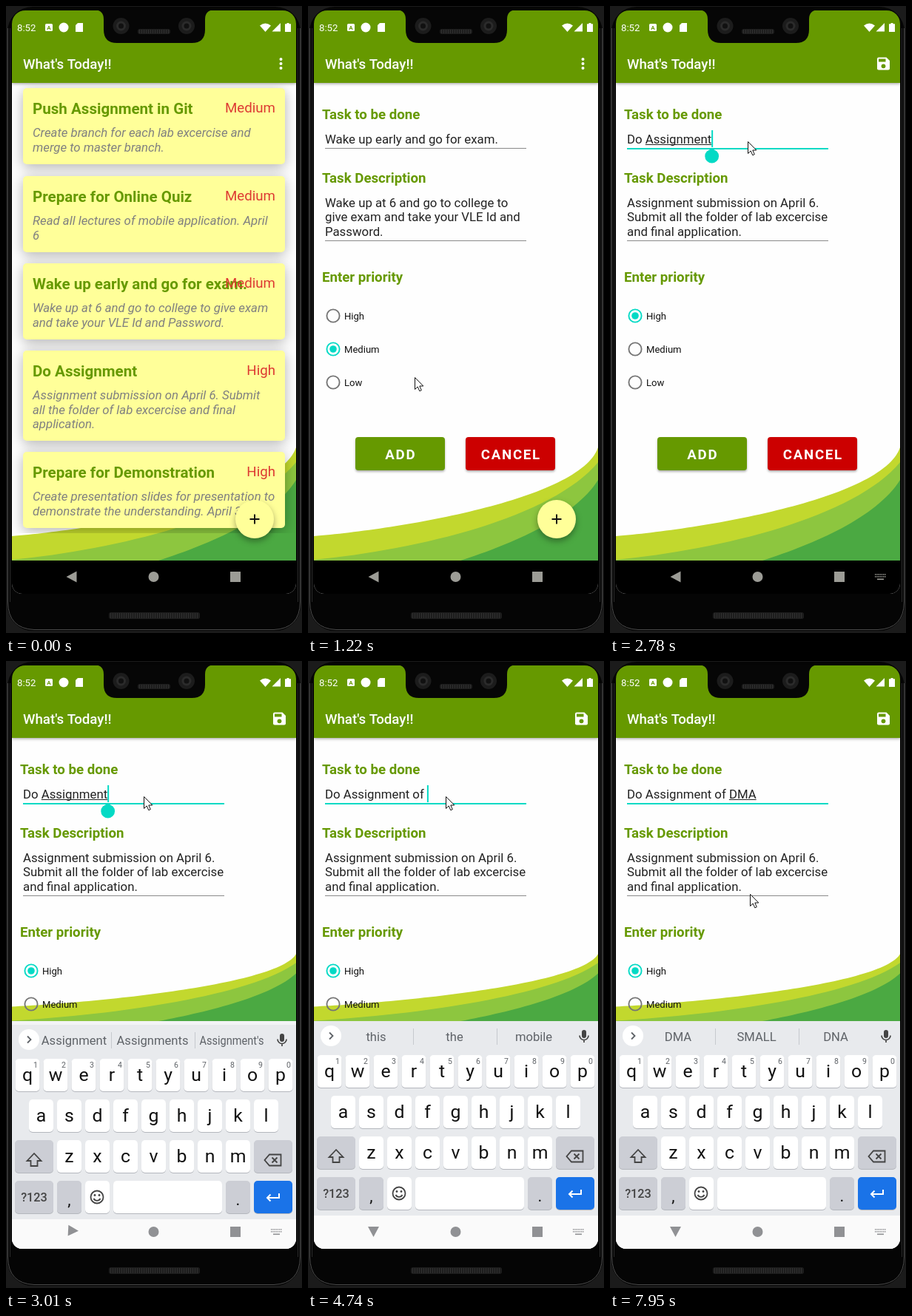
These frames come from a looping animation (400 by 848 pixels, 8000 ms). An HTML page with a canvas:

```html
<!DOCTYPE html>
<html lang="en">
<head>
<meta charset="utf-8">
<title>To-do app</title>
<style>
html, body { margin: 0; width: 100%; height: 100%; overflow: hidden; background: #111; }
canvas { display: block; width: 400px; height: 848px; }
</style>
</head>
<body>
<canvas id="stage" width="400" height="848"></canvas>
<script>
const c = document.getElementById('stage').getContext('2d');
const LOOP = 8000, TAU = Math.PI * 2;
const GREEN = '#669900', TEAL = '#03dac5', CREAM = '#ffff99';

const cards = [
  [111, 103, 'Push Assignment in Git', 'Medium', 'Create branch for each lab excercise and|merge to master branch.'],
  [230, 103, 'Prepare for Online Quiz', 'Medium', 'Read all lectures of mobile application. April|6'],
  [348, 103, 'Wake up early and go for exam.', 'Medium', 'Wake up at 6 and go to college to give exam|and take your VLE Id and Password.'],
  [466, 122, 'Do Assignment', 'High', 'Assignment submission on April 6. Submit|all the folder of lab excercise and final|application.'],
  [603, 103, 'Prepare for Demonstration', 'High', 'Create presentation slides for presentation to|demonstrate the understanding. April 30.']
];

// [start, text, index where the composing underline starts (-1: none)]
const typing = [
  [0, 'Do Assignment', -1], [2620, 'Do Assignment', 3], [3490, 'Do Assignment ', -1],
  [3880, 'Do Assignment o', -1], [4110, 'Do Assignment o', 14], [4340, 'Do Assignment of', 14],
  [4570, 'Do Assignment of ', 14], [4740, 'Do Assignment of ', -1], [5750, 'Do Assignment of D', -1],
  [5920, 'Do Assignment of DM', 17], [6160, 'Do Assignment of DMA', 17]
];
const hints = [
  [0, 'Assignment', 'Assignments', "Assignment's"], [3650, 'of', 'in', 'and'],
  [4110, 'of', 'on', 'off'], [4570, 'of', 'or', 'if'], [4740, 'this', 'the', 'mobile'],
  [5990, 'D', 'Do', 'Day'], [6240, 'DM', 'SM', 'DMs'], [6480, 'DMA', 'SMALL', 'DNA']
];
const at = (list, t) => list.filter(e => e[0] <= t).pop();

function text(s, x, y, size, color, style = '', align = 'left', max) {
  c.font = `${style} ${size}px Roboto, sans-serif`;
  c.fillStyle = color;
  c.textAlign = align;
  c.fillText(s, x, y, max);
}
function lines(s, x, y, ...rest) {
  s.split('|').forEach((l, i) => text(l, x, y + i * 19.6, ...rest));
}
function rect(x, y, w, h, color) {
  c.fillStyle = color;
  c.fillRect(x, y, w, h);
}
function box(x, y, w, h, r, color) {
  c.beginPath();
  c.roundRect(x, y, w, h, r);
  c.fillStyle = color;
  c.fill();
}
function dot(x, y, r, color) {
  c.beginPath();
  c.arc(x, y, r, 0, TAU);
  c.fillStyle = color;
  c.fill();
}
function ring(x, y, r, w, color) {
  c.beginPath();
  c.arc(x, y, r, 0, TAU);
  c.lineWidth = w;
  c.strokeStyle = color;
  c.stroke();
}
function fill(d, color) {
  c.fillStyle = color;
  c.fill(new Path2D(d));
}
function line(d, color, w) {
  c.lineWidth = w;
  c.strokeStyle = color;
  c.stroke(new Path2D(d));
}
function shadowed(alpha, blur, dy, draw) {
  c.save();
  c.shadowColor = `rgba(0,0,0,${alpha})`;
  c.shadowBlur = blur;
  c.shadowOffsetY = dy;
  draw();
  c.restore();
}

function backdrop(bottom) {
  rect(8, 104, 384, 691, '#fefefe');
  c.save();
  c.translate(0, 104);
  c.scale(1, (bottom - 104) / 646);
  c.translate(0, -104);
  fill('M8 717C120 708 368 668 392 597V750H8Z', '#c2d82e');
  fill('M8 749C150 735 330 692 392 617V750H8Z', '#8dc63f');
  fill('M206 750C275 728 360 692 392 641V750Z', '#4ba942');
  c.restore();
}

function list() {
  c.save();
  c.beginPath();
  c.rect(8, 104, 384, 609);
  c.clip();
  for (const [y, h, title, level, note] of cards) {
    shadowed(0.3, 18, 4, () => box(23, y, 354, h, 5, CREAM));
    text(title, 36, y + 35, 20.55, GREEN, 'bold');
    text(level, 364, y + 33, 18.7, '#dd3a33', '', 'right');
    lines(note, 36, y + 66, 16.8, '#808080', 'italic');
  }
  c.restore();
}

function fab(scale) {
  c.save();
  c.translate(336, 694);
  c.scale(scale, scale);
  shadowed(0.35, 8, 4, () => dot(0, 0, 26, CREAM));
  line('M-6.5 0H6.5M0 -6.5V6.5', '#111', 2);
  c.restore();
}

function form(t) {
  const old = t < 1300, focus = t >= 2540;
  const [, typed, mark] = at(typing, t);
  const label = (s, y) => text(s, 19, y, 18.68, GREEN, 'bold');
  label('Task to be done', 153);
  label('Task Description', 239);
  label('Enter priority', 373);

  text(old ? cards[2][2] : typed, 23, 186, 16.8, '#222');
  const width = n => c.measureText(typed.slice(0, n)).width;
  const end = 23 + width(typed.length);
  if (focus) {
    rect(23, 192, 272, 2, TEAL);
    if (mark >= 0) rect(23 + width(mark), 187, width(typed.trimEnd().length) - width(mark), 1, '#222');
    const off = (t >= 5290 && t < 5750) || (t >= 6940 && t < 7440) || t >= 7940;
    if (!off) rect(end, 168, 2, 23, TEAL);
    if (t >= 2620 && t < 3490) {
      c.save();
      c.translate(end + 0.5, 192.5);
      const s = t < 2700 ? 0.6 : 1;
      c.scale(s, s);
      fill('M0 0L6.7 4.1A9.4 9.4 0 1 1 -6.7 4.1Z', TEAL);
      c.restore();
    }
  } else rect(23, 192, 272, 1, '#8a8a8a');

  lines(old ? 'Wake up at 6 and go to college to|give exam and take your VLE Id and|Password.'
    : 'Assignment submission on April 6.|Submit all the folder of lab excercise|and final application.', 23, 271.5, 16.8, '#222');
  rect(23, 317, 272, 1, '#8a8a8a');

  ['High', 'Medium', 'Low'].forEach((s, i) => {
    const y = 419 + i * 45, on = i === (old ? 1 : 0);
    ring(34, y, 8.6, 1.9, on ? TEAL : '#757575');
    if (on) dot(34, y, 4.8, TEAL);
    text(s, 49, y + 5, 13.08, '#111');
  });

  [[64, GREEN, 'ADD'], [213, '#cc0000', 'CANCEL']].forEach(([x, color, s]) => {
    shadowed(0.3, 3, 2, () => box(x, 583, 121, 45, 4, color));
    c.letterSpacing = '1.67px';
    text(s, x + 61.3, 613, 18.68, '#fff', 'bold', 'center');
    c.letterSpacing = '0px';
  });
}

function keyboard(t) {
  const drop = t < 3010 ? 60 : t < 3110 ? 5 : t < 3180 ? 2 : 0;
  const ink = '#111', gray = '#5f6368', dark = '#ccced5';
  const key = (x, y, w, color = '#fff') => {
    box(x, y + 1, w, 44, 5, '#b4b7bd');
    box(x, y, w, 44, 5, color);
  };
  c.save();
  rect(8, 487, 384, 308, '#f3f4f6');
  c.translate(0, drop);
  rect(8, 487, 384, 270, '#e8eaed');
  rect(8, 750, 384, 60, '#fafafa');

  dot(31, 507, 14, '#fff');
  line('M29 502.5L33.5 507L29 511.5', gray, 1.8);
  at(hints, t).slice(1).forEach((s, i) =>
    text(s, [92, 198, 305][i], 514, 16.6, gray, '', 'center', i < 2 ? 100 : 87));
  rect(142, 497, 1, 22, '#c6c9ce');
  rect(255, 497, 1, 22, '#c6c9ce');
  box(370, 499, 6, 11, 3, '#444');
  line('M367 506.5A6 6 0 0 0 379 506.5M373 512.5V516', '#444', 1.7);

  [['qwertyuiop', 12.5, 533], ['asdfghjkl', 31, 588], ['zxcvbnm', 69, 643]].forEach(([row, x0, y], r) => {
    [...row].forEach((ch, i) => {
      const x = x0 + i * 38;
      key(x, y, 33);
      text(ch, x + 16.5, y + 30, 24.8, ink, '', 'center');
      if (!r) text((i + 1) % 10, x + 27.5, y + 12, 10.5, gray, '', 'center');
    });
  });
  key(12, 643, 52, dark);
  key(335, 643, 52, dark);
  line('M38 661L28.5 671H33.5V678H42.5V671H47.5Z', '#444', 1.8);
  line('M356 662.5H371.5V677.5H356L349.5 670ZM359.5 666.5L366.5 673.5M366.5 666.5L359.5 673.5', '#444', 1.8);

  key(12, 698, 52, dark);
  key(69, 698, 33, dark);
  key(107, 698, 33);
  key(145, 698, 147);
  key(297, 698, 33, dark);
  key(335, 698, 52, '#1a73e8');
  text('?123', 38, 726, 16.3, '#444', '500', 'center');
  text(',', 85.5, 731, 22, ink, '', 'center');
  text('.', 313.5, 731, 22, ink, '', 'center');
  ring(123, 720, 8.5, 1.8, '#444');
  dot(120, 717.5, 1.4, '#444');
  dot(126, 717.5, 1.4, '#444');
  line('M118.5 722A5 5 0 0 0 127.5 722', '#444', 1.8);
  line('M369 715V721H353M357.5 716.5L353 721L357.5 725.5', '#fff', 2);
  c.restore();
}

function navBar(t) {
  const up = t >= 2930;
  if (!up) rect(8, 750, 384, 45, '#000');
  const color = up ? '#909194' : '#9c9c96';
  const turn = t < 2930 ? 180 : t < 3010 ? 270 : t < 3110 ? 363 : t < 3180 ? 415 : 450;
  c.save();
  c.translate(turn === 363 ? 91 : 88.5, turn === 363 ? 770.5 : 772);
  c.rotate(turn * Math.PI / 180);
  fill('M7 0L-7 -7.5V7.5Z', color);
  c.restore();
  dot(199.5, 772, 7, color);
  rect(303, 765, 14, 14, color);
  if (t >= 2620) {
    for (let i = 0; i < 14; i++) rect(358 + (i % 7) * 2.2, 768 + (i / 7 | 0) * 3, 1.3, 1.6, color);
    rect(361, 774.5, 9, 1.6, color);
  }
}

function topBar(saving) {
  shadowed(0.4, 4, 1, () => rect(8, 6, 384, 98, GREEN));
  text("What's Today!!", 23, 84.5, 18.68, '#fff', '500');
  text('8:52', 15, 34, 13.2, '#fff');
  box(53, 24, 10, 10, 1.5, '#fff');
  text('A', 58, 32, 8, GREEN, 'bold', 'center');
  dot(78, 29, 6.5, '#fff');
  fill('M97 23H104V35H94V26Z', '#fff');
  fill('M343 26.5Q350.5 20.5 358 26.5L350.5 35Z', '#fff');
  fill('M371 23V34.5H359.5Z', '#fff');
  fill('M379.5 23H382.5V24.2H385V35H377V24.2H379.5Z', '#fff');
  if (saving) {
    fill('M363 69.5H373.5L378 74V84.5Q378 86.5 376 86.5H363Q361 86.5 361 84.5V71.5Q361 69.5 363 69.5Z', '#fff');
    rect(363, 71.5, 9.5, 4, GREEN);
    dot(369.5, 81.3, 2.9, GREEN);
  } else [72, 78, 84].forEach(y => dot(371.5, y, 2, '#fff'));
}

function body() {
  rect(0, 0, 400, 848, '#1b1b1b');
  box(2, 1, 396, 844, 34, '#050505');
  line('M2.5 30V806Q3 842 38 843.5H362Q397 842 397.5 806V30', '#4a4a4a', 1);
  line('M5.5 30V806', '#2a2a2a', 1);
  line('M394.5 30V806', '#2a2a2a', 1);
}
function grille(x, y, w, h) {
  box(x, y, w, h, 3, '#1d1d1d');
  for (let i = 2; i < w - 1; i += 3) rect(x + i, y + 1, 1, h - 2, '#303030');
}
function notch() {
  fill('M120 5Q132 6 132 18V32Q132 50 150 50H251Q269 50 269 32V18Q269 6 281 5Z', '#060606');
  [155.5, 244].forEach(x => {
    dot(x, 27, 11, '#1c1c1c');
    dot(x, 27, 6.5, '#2b2b2b');
    dot(x, 27, 3.5, '#111');
  });
  grille(178, 31, 44, 7);
  grille(139, 820, 123, 9);
}

// Pointer samples are held for about 78 ms, like a screen recording.
function progress(t, start, n, first) {
  return Math.max(0, Math.min(1, (Math.floor((t - start) / 78) + first) / n));
}
function pointer(t) {
  if (t < 210) return;
  let x, y;
  if (t < 1750) {
    const p = progress(t, 210, 7, 0), e = p * p * (3 - 2 * p);
    x = 289 - 145 * e;
    y = 824 - 322 * e;
  } else if (t < 7250) {
    const p = progress(t, 1750, 4, 1);
    x = 144 + 42 * p;
    y = 502 - 319 * p;
  } else {
    const p = progress(t, 7250, 9, 1), q = 1 - p;
    x = q * q * 186 + 2 * p * q * 146.5 + p * p * 189;
    y = 183 + 132 * p * p * (3 - 2 * p);
  }
  if ((t >= 910 && t < 1140) || (t >= 2370 && t < 2540)) dot(x, y, 15, 'rgba(255,255,0,.47)');
  c.save();
  c.translate(Math.round(x) + 0.5, Math.round(y) + 0.5);
  const d = 'M0 0V16L3.7 12.5L6.3 18.3L8.8 17.2L6.3 11.5H11.3Z';
  fill(d, '#fff');
  line(d, '#111', 1);
  c.restore();
}

function draw(t) {
  const typingOpen = t >= 2930;
  body();
  c.save();
  c.beginPath();
  c.roundRect(8, 6, 384, 789, [18, 18, 14, 14]);
  c.clip();
  backdrop(typingOpen ? 487 : 750);
  if (t < 1220) list();
  if (t >= 1140) {
    if (t < 1220) {
      c.globalAlpha = 0.5;
      backdrop(750);
    }
    form(t);
    c.globalAlpha = 1;
  }
  if (t < 1370) fab(t < 1300 ? 1 : 0.5);
  topBar(t >= 1300);
  if (typingOpen) keyboard(t);
  navBar(t);
  c.restore();
  notch();
  pointer(t);
}

const start = performance.now();
function tick() {
  draw((performance.now() - start) % LOOP);
  requestAnimationFrame(tick);
}
tick();
</script>
</body>
</html>
```
